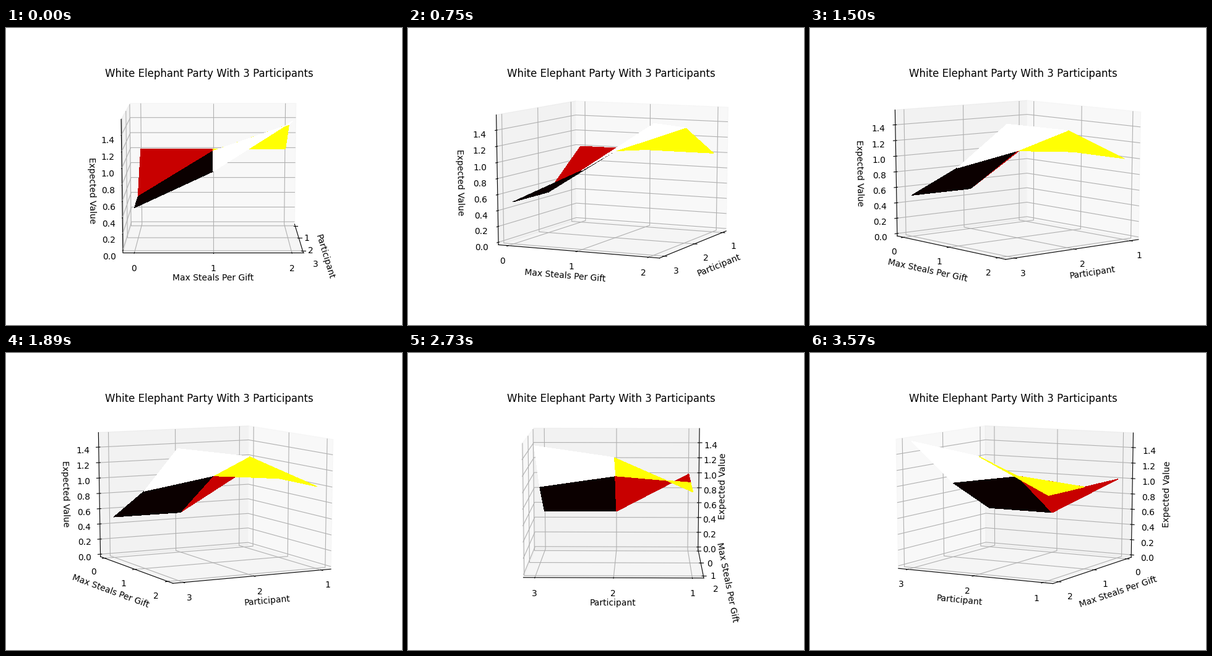
Animation, 640 px wide and 480 px high, one loop 3.6 s. Source, as a matplotlib script:

```python
import numpy as np
import matplotlib.pyplot as plt
from matplotlib.animation import FuncAnimation
from matplotlib.collections import LineCollection, PolyCollection
from matplotlib.patches import Polygon

FRAMES, INTERVAL = 120, 30
ELEV, DIST = np.radians(10), 10
DELTA = 1 / 12                  # axis decoration unit, in box widths
EDGE = 0.5 + DELTA / 4          # half size of the drawn box
PER_POINT = 48 / (72 * (4.96 + 3.696))
LINE = 0.8

# Expected value: rows are participants 1..3, columns are steals 0..2
VALUES = np.array([[1, 1, 1],
                   [1 / 2, 13 / 12, 17 / 12],
                   [1 / 2, 17 / 18, 14 / 9]])
LOW = np.array([0.9, -0.1, 0.0])
SIZE = np.array([2.2, 2.2, VALUES.max()])

# label, ticks, tick format, direction in which the axis is pushed outward
AXES = [
    ("Participant", np.arange(1, 4), "{:.0f}", 1),
    ("Max Steals Per Gift", np.arange(3), "{:.0f}", 0),
    ("Expected Value", np.arange(8) * 0.2, "{:.1f}", 0),
]
PANE_GREYS = (0.95, 0.90, 0.925)

fig = plt.figure(figsize=(6.4, 4.8), dpi=100, facecolor="white")
ax = fig.add_axes([0.125, 0.11, 0.775, 0.77])
fig.text(328 / 640, 401.17 / 480, "White Elephant Party With 3 Participants",
         size=12, ha="center", va="baseline")


def to_box(points):
    """Data coordinates to a unit cube centred on the origin."""
    return (np.asarray(points, float) - LOW) / SIZE - 0.5


def build_cells():
    rows, cols = np.indices(VALUES.shape)
    grid = to_box(np.stack([rows + 1, cols, VALUES], axis=-1))
    corners = [(0, 0), (1, 0), (1, 1), (0, 1)]
    cells, heights = [], []
    for i in range(2):
        for j in range(2):
            cells.append([grid[i + a, j + b] for a, b in corners])
            heights.append(np.mean([VALUES[i + a, j + b] for a, b in corners]))
    heights = np.array(heights)
    shade = (heights - heights.min()) / np.ptp(heights)
    return np.array(cells), plt.get_cmap("hot")(shade)


CELLS, COLORS = build_cells()


def project(points, azim):
    """Perspective view: returns flat positions and depth."""
    x, y, z = np.moveaxis(np.asarray(points, float), -1, 0)
    toward = x * np.cos(azim) + y * np.sin(azim)
    right = y * np.cos(azim) - x * np.sin(azim)
    up = z * np.cos(ELEV) - toward * np.sin(ELEV)
    depth = DIST - toward * np.cos(ELEV) - z * np.sin(ELEV)
    return np.stack([right / depth, up / depth], axis=-1), depth


def flip(point, *dims):
    out = np.array(point, float)
    out[list(dims)] *= -1
    return out


def push_out(point, index, points_away):
    """Move away from the centre, but not along the axis itself."""
    step = points_away * PER_POINT * DELTA * np.sign(point)
    step[index] = 0
    return point + step


def draw_pane(index, far, azim):
    a, b = [d for d in range(3) if d != index]
    base = far.copy()
    base[[a, b]] = -EDGE
    corners = [base, flip(base, a), flip(base, a, b), flip(base, b)]
    ax.add_patch(Polygon(project(corners, azim)[0], closed=False, lw=1,
                         color=(PANE_GREYS[index],) * 3, alpha=0.5, zorder=1))


def draw_axis(index, far, azim):
    label, ticks, fmt, side = AXES[index]
    start = flip(far, side)
    ends = np.array([start, flip(start, index)])
    flat = project(ends, azim)[0]
    ax.plot(*flat.T, color="black", lw=LINE, zorder=1)

    dx, dy = np.diff(ax.transData.transform(flat), axis=0)[0]
    angle = np.degrees(np.arctan2(dy, dx)) % 180
    if angle > 90:
        angle -= 180
    spot = project(push_out(ends.mean(axis=0), index, 25), azim)[0]
    ax.text(*spot, label, size=10, ha="center", va="center",
            rotation=angle, zorder=1)

    places = (ticks - LOW[index]) / SIZE[index] - 0.5
    lines = []
    for place in places:
        corner = far.copy()
        corner[index] = place
        path = [flip(corner, (index + 1) % 3), corner,
                flip(corner, (index + 2) % 3)]
        lines.append(project(path, azim)[0])
    ax.add_collection(LineCollection(lines, colors="#b0b0b0",
                                     linewidths=LINE, zorder=1),
                      autolim=False)

    for tick, place in zip(ticks, places):
        pos = start.copy()
        pos[index] = place
        mark = np.array([pos, pos])
        mark[:, side] += np.array([0.1, -0.2]) * DELTA * np.sign(far[side])
        ax.plot(*project(mark, azim)[0].T, color="black", lw=LINE, zorder=1)
        spot = project(push_out(pos, index, 11.5), azim)[0]
        ax.text(*spot, fmt.format(tick), size=10, ha="center", va="top",
                zorder=1)


def draw_surface(azim):
    flat, depth = project(CELLS, azim)
    order = np.argsort((1 / depth).mean(axis=1))    # farthest first
    ax.add_collection(PolyCollection(flat[order], facecolors=COLORS[order],
                                     linewidths=0, antialiaseds=False,
                                     zorder=1), autolim=False)


def update(frame):
    azim = np.radians(frame)
    ax.clear()
    ax.set_axis_off()
    ax.set_xlim(-0.095, 0.09)
    ax.set_ylim(-0.095, 0.09)
    far = EDGE * np.array([1.0 if frame > 90 else -1.0, -1.0, -1.0])
    for index in range(3):
        draw_pane(index, far, azim)
    for index in range(3):
        draw_axis(index, far, azim)
    draw_surface(azim)
    return ()


anim = FuncAnimation(fig, update, frames=FRAMES, interval=INTERVAL,
                     repeat=True, blit=False)
plt.show()
```
